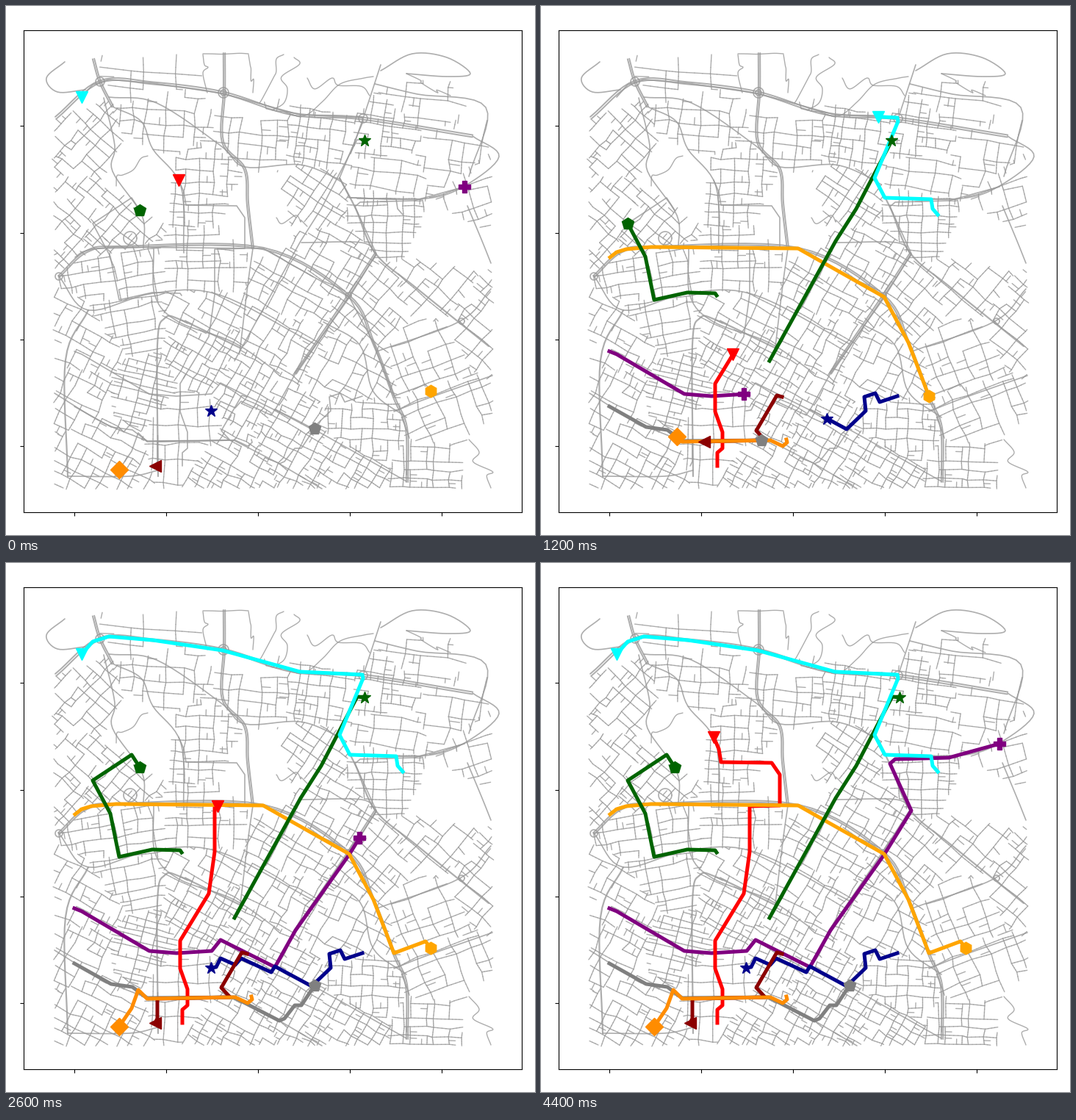
Animation of 720 by 720 pixels, one loop 4600 ms. Source, as a matplotlib script:

```python
import numpy as np
import matplotlib.pyplot as plt
from matplotlib.animation import FuncAnimation
from matplotlib.collections import LineCollection

SIZE, DPI = 720, 100
FRAMES, STEP_MS = 23, 200
LEFT, RIGHT, TOP, BOTTOM = 24, 702, 33, 689
STREET = dict(color="#999999", alpha=0.8, zorder=1)

rng = np.random.default_rng(11)
fig = plt.figure(figsize=(SIZE / DPI, SIZE / DPI), dpi=DPI, facecolor="white")
ax = fig.add_axes([LEFT / SIZE, 1 - BOTTOM / SIZE,
                   (RIGHT - LEFT) / SIZE, (BOTTOM - TOP) / SIZE])
ax.set(xlim=(LEFT, RIGHT), ylim=(BOTTOM, TOP),
       xticks=np.arange(93, 600, 125), yticks=np.linspace(163.2, 599.2, 4))
ax.tick_params(labelbottom=False, labelleft=False)


# ---------- streets: each quarter fills the area nearest to its centre ----------
quarters = []


def quarter(angle, spacing, *centres, aspect=0.82):
    for c in centres:
        quarters.append((np.array(c, float), np.radians(angle), spacing, aspect))


def gaps(*centres):
    quarter(0, 0, *centres)


def grid(centre, angle, dx, aspect, reach=115):
    """Uneven street grid with missing links and dead ends."""
    dy = dx * aspect
    u = np.array([np.cos(angle), np.sin(angle)])
    v = np.array([-u[1], u[0]])
    i, j = (np.arange(-n, n + 1) + rng.uniform(-0.25, 0.25, 2 * n + 1)
            for n in (int(reach / dx), int(reach / dy)))
    node = (centre + i[:, None, None] * dx * u + j[None, :, None] * dy * v
            + rng.normal(0, 0.07 * dy, (i.size, j.size, 2)))
    for start, end, across in ((node[:-1], node[1:], v * dy),
                               (node[:, :-1], node[:, 1:], u * dx)):
        for s, e in zip(start.reshape(-1, 2), end.reshape(-1, 2)):
            if rng.random() < 0.84:
                for t in (0, 0.25, 0.5, 0.75):
                    yield s + (e - s) * t, s + (e - s) * (t + 0.25)
                if rng.random() < 0.2:
                    m = s + (e - s) * rng.uniform(0.3, 0.7)
                    yield m, m + across * rng.choice([-0.55, 0.55])


def pave():
    centres = np.array([q[0] for q in quarters])
    kept = []
    for k, q in enumerate(quarters):
        if q[2] == 0:
            continue
        links = np.array(list(grid(*q)))
        mid = links.mean(axis=1)
        near = np.hypot(*(mid[:, None] - centres).T).argmin(axis=0)
        inside = np.all((mid > 66) & (mid < (661, 656)), axis=1)
        kept.extend(links[(near == k) & inside])
    ax.add_collection(LineCollection(kept, linewidths=1.0, capstyle="round",
                                     **STREET), autolim=False)


quarter(42, 18, (100, 190), (95, 275), (145, 295))
quarter(4, 22, (215, 160), (345, 175))
quarter(2, 34, (195, 85))
quarter(2, 18, (265, 240))
quarter(8, 16, (425, 180), (525, 178))
quarter(8, 26, (530, 228), (600, 205), (570, 130))
quarter(1, 17, (520, 285), aspect=0.7)
quarter(-18, 20, (635, 255))
quarter(33, 17, (410, 260))
quarter(0, 19, (268, 360))
quarter(-10, 19, (165, 370), (165, 430))
quarter(27, 20, (265, 415), (120, 465), (110, 530), (470, 500))
quarter(29, 18, (390, 390), (375, 450), (445, 345))
quarter(40, 21, (500, 410), (585, 385), (640, 430))
quarter(-21, 23, (575, 470), (595, 560))
quarter(29, 15, (270, 475), (330, 520), (310, 625), (390, 590), (460, 625))
quarter(14, 20, (180, 525), aspect=0.42)
quarter(27, 18, (135, 600))
quarter(0, 21, (240, 575), aspect=1.1)
quarter(2, 16, (485, 578), (585, 630))
gaps((190, 232), (350, 275), (600, 318), (330, 95), (440, 105), (70, 105),
     (560, 72), (645, 85), (655, 625))
pave()


# ---------- main roads ----------
def smooth(p, n=8):
    """Catmull-Rom curve through the points."""
    q = np.vstack([2 * p[0] - p[1], p, 2 * p[-1] - p[-2]])
    t = np.linspace(0, 1, n, endpoint=False)[:, None]
    parts = [0.5 * (2 * b + (c - a) * t + (2 * a - 5 * b + 4 * c - d) * t**2
                    + (3 * b - a - 3 * c + d) * t**3)
             for a, b, c, d in zip(q, q[1:], q[2:], q[3:])]
    return np.vstack(parts + [p[-1:]])


def stroke(p, lw=1.2):
    ax.plot(*p.T, lw=lw, solid_capstyle="round", **STREET)


def curve(*points, lw=1.2):
    stroke(smooth(np.array(points, float)), lw)


def highway(*points, gap=2.4):
    p = smooth(np.array(points, float))
    dx, dy = np.gradient(p, axis=0).T
    side = np.column_stack([-dy, dx]) / np.hypot(dx, dy)[:, None]
    for s in (-0.5, 0.5):
        stroke(p + s * gap * side, 1.4)


def winding(start, end, sway=6):
    p = np.linspace(start, end, 6)
    p[1:-1] += rng.normal(0, sway, (4, 2))
    stroke(smooth(p), 1.0)


def ring(x, y, r):
    a = np.linspace(0, 2 * np.pi, 25)
    stroke(np.column_stack([x + r * np.cos(a), y + r * np.sin(a)]))


highway((68, 152), (128, 103), (200, 105), (295, 118), (390, 147), (485, 153),
        (635, 177), gap=3)
highway((119, 72), (128, 103), (145, 137))
highway((297, 64), (297, 117), (295, 185), (325, 222), (329, 270), (336, 330))
highway((72, 368), (110, 334), (160, 328), (350, 330), (466, 394), (500, 458),
        (528, 532), (545, 575), (546, 648))
highway((394, 500), (466, 394), (503, 337))
curve((635, 177), (671, 205), (624, 245), (572, 262), (478, 262))
curve((145, 137), (184, 157), (200, 195), (238, 245), (242, 336))
curve((133, 125), (148, 190), (145, 225), (185, 285), (187, 330))
curve((140, 124), (205, 132), (292, 190), (325, 219), (400, 216), (454, 236))
curve((336, 330), (329, 380), (318, 472))
curve((454, 234), (476, 276), (503, 337), (560, 385), (657, 463), lw=1.6)
curve((469, 201), (486, 153), (510, 80))
curve((402, 322), (484, 322), (503, 337))
curve((72, 368), (112, 414), (200, 391), (290, 393), (420, 460))
curve((112, 414), (81, 482), (84, 640), lw=1.6)
curve((207, 640), (206, 462), (216, 425), (240, 428), (320, 466), lw=1.6)
curve((201, 330), (203, 395), (235, 430), (310, 458), (372, 500))
curve((432, 430), (482, 462), (500, 525), (545, 560))
curve((366, 549), (417, 575), (545, 647))
curve((66, 527), (130, 566), (192, 592))
curve((372, 623), (430, 657))
curve((505, 470), (618, 429), (660, 385))
curve((528, 552), (571, 535), (662, 503))
curve((502, 106), (560, 120), (653, 138), (630, 232))
curve((84, 640), (168, 640), (207, 632))
curve((80, 76), (55, 98), (70, 117), (108, 114))
curve((510, 88), (553, 65), (600, 70), (632, 92), (600, 96), (545, 92))
curve((628, 272), (648, 320), (660, 350))

for x in (268, 330):
    winding((x, 66), (x + 6, 118), 3)
winding((268, 65), (330, 65), 0.5)
winding((345, 132), (378, 66))
winding((362, 142), (392, 70))
winding((380, 145), (500, 96), 9)
winding((410, 98), (495, 122), 8)
winding((545, 92), (605, 122), 6)
winding((368, 288), (410, 300), 7)
winding((150, 245), (193, 204), 4)
winding((630, 590), (660, 656), 6)

for x, y, r in ((128, 103, 6), (296, 118, 7), (296, 118, 4), (486, 153, 6),
                (72, 368, 5), (466, 394, 4), (620, 429, 4), (169, 316, 9)):
    ring(x, y, r)


# ---------- vehicles ----------
class Vehicle:
    """A marker driving along a route, with a few timed (step, x, y) stops."""

    def __init__(self, color, marker, arrive, route, stops=()):
        self.route = np.array(route, float)
        self.seg = np.diff(self.route, axis=0)
        self.len = np.hypot(*self.seg.T)
        self.at = np.concatenate([[0], np.cumsum(self.len)])
        self.steps = [0, *(s[0] for s in stops), arrive]
        self.dist = [0, *(self.locate(s[1:]) for s in stops), self.at[-1]]
        stroke(self.route)
        self.trail, = ax.plot([], [], color=color, lw=3.6, zorder=3)
        self.dot, = ax.plot([], [], color=color, marker=marker, ms=12, zorder=4)

    def locate(self, point):
        """Distance along the route of the spot nearest to the point."""
        rel = np.array(point, float) - self.route[:-1]
        t = np.clip((rel * self.seg).sum(axis=1) / self.len**2, 0, 1)
        k = np.argmin(np.hypot(*(rel - t[:, None] * self.seg).T))
        return self.at[k] + t[k] * self.len[k]

    def show(self, step):
        d = np.interp(step, self.steps, self.dist) if step else self.at[-1]
        head = [np.interp(d, self.at, c) for c in self.route.T]
        pts = np.vstack([self.route[self.at < d], head])
        self.trail.set_data(*(pts.T if step else ([], [])))
        self.dot.set_data([head[0]], [head[1]])


fleet = [
    Vehicle("gray", "p", 12,
            [(93, 545), (143, 573), (172, 577), (192, 592), (310, 591),
             (372, 623), (379, 620), (393, 602), (402, 602), (420, 575)],
            [(2, 156, 575), (6, 300, 591), (9, 394, 602)]),
    Vehicle("purple", "P", 16,
            [(93, 470), (103, 474), (195, 528), (232, 531), (280, 528),
             (292, 513), (366, 550), (394, 500), (467, 397), (504, 337),
             (475, 273), (482, 267), (555, 265), (624, 246)],
            [(2, 162, 509), (6, 276, 528), (9, 354, 544), (11, 399, 492),
             (13, 482, 374)]),
    Vehicle("darkblue", "*", 13,
            [(485, 531), (461, 539), (455, 527), (440, 532), (442, 551),
             (416, 576), (366, 549), (361, 557), (320, 538), (312, 547),
             (292, 538), (286, 550), (279, 551)],
            [(2, 452, 528), (6, 389, 562), (9, 329, 542), (11, 312, 547)]),
    Vehicle("darkred", "<", 12,
            [(328, 532), (321, 530), (293, 578), (305, 591), (206, 593),
             (206, 620), (203, 626)],
            [(2, 309, 551), (6, 222, 592), (9, 206, 597)]),
    Vehicle("red", "v", 22,
            [(240, 626), (240, 608), (247, 602), (247, 580), (237, 552),
             (237, 514), (276, 450), (284, 393), (284, 331), (325, 330),
             (325, 288), (314, 272), (245, 271), (242, 253), (235, 237)],
            [(2, 238, 560), (6, 261, 474), (9, 283, 396), (12, 284, 338),
             (16, 320, 330), (18, 325, 294), (20, 266, 271)]),
    Vehicle("orange", "h", 8,
            [(94, 342), (103, 335), (116, 331), (150, 328), (350, 330),
             (467, 396), (500, 458), (528, 531), (571, 515), (578, 524)],
            [(2, 332, 330), (4, 501, 460), (6, 528, 531)]),
    Vehicle("darkorange", "D", 9,
            [(334, 590), (335, 594), (329, 599), (312, 591), (192, 593),
             (180, 581), (171, 606), (154, 631)],
            [(2, 286, 591), (6, 185, 586)]),
    Vehicle("darkgreen", "p", 8,
            [(239, 394), (237, 391), (199, 390), (154, 400), (142, 341),
             (118, 296), (171, 261), (182, 278)],
            [(2, 192, 391), (4, 146, 365), (6, 118, 296)]),
    Vehicle("darkgreen", "*", 6.2,
            [(311, 483), (401, 320), (429, 276), (478, 182), (488, 183)]),
    Vehicle("cyan", "v", 9,
            [(540, 284), (533, 276), (531, 263), (468, 261), (454, 234),
             (486, 157), (485, 152), (400, 148), (295, 119), (200, 105),
             (140, 100), (118, 107), (103, 124)],
            [(2, 490, 262), (6, 459, 151), (8, 200, 105)]),
]


def draw(step):
    for car in fleet:
        car.show(step)
    return []


anim = FuncAnimation(fig, draw, frames=FRAMES, init_func=lambda: draw(0),
                     interval=STEP_MS, repeat=True, repeat_delay=0)
plt.show()
```
